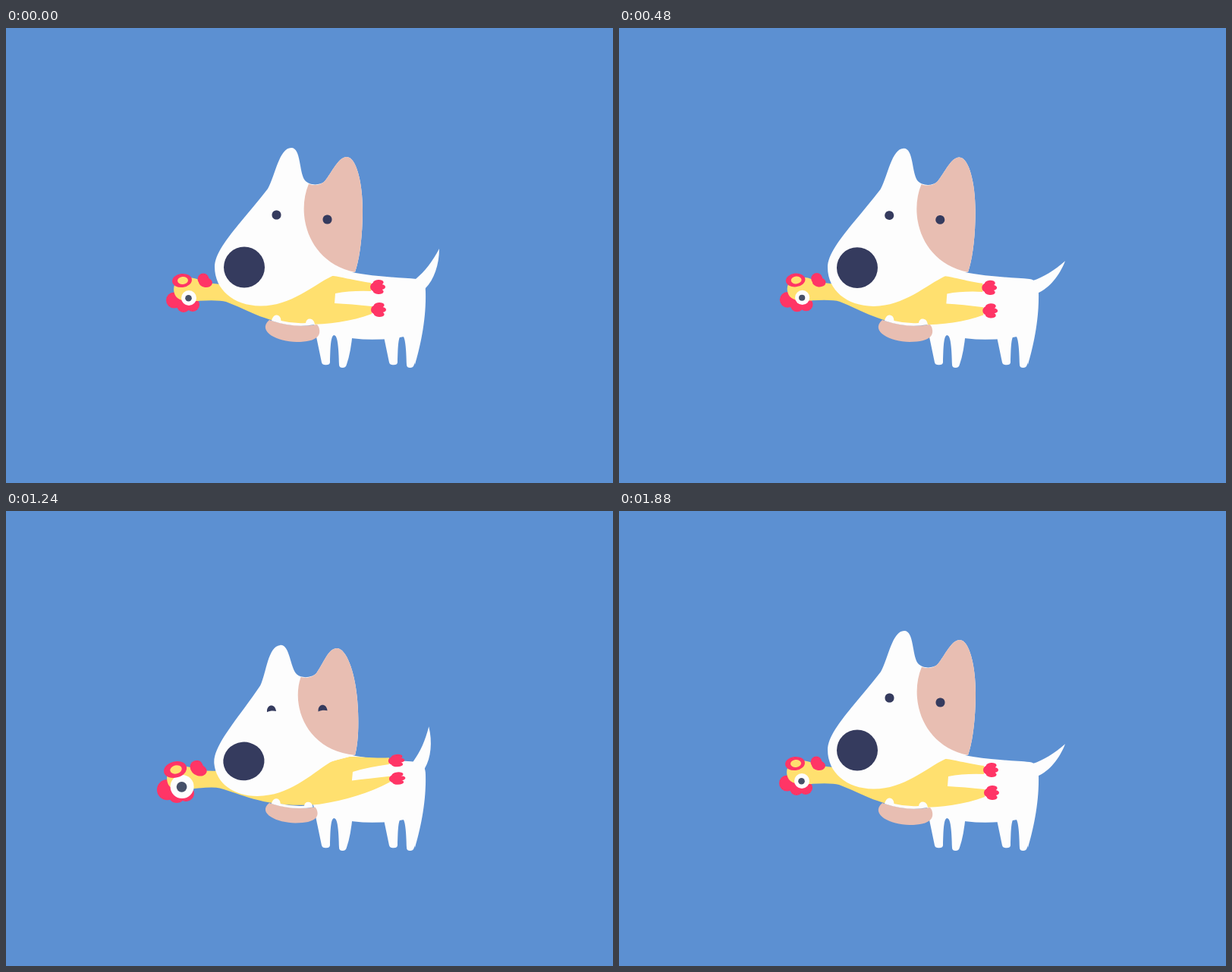
Recreate the animation shown at these times as an HTML page. Size 800 by 600 pixels, loop 1.92 s.

```html
<!DOCTYPE html>
<html lang="en">
<head>
<meta charset="utf-8">
<title>Dog with rubber chicken</title>
<style>
  html, body { margin: 0; width: 100%; height: 100%; overflow: hidden; background: #5c90d2; }
  svg { display: block; width: 100%; height: 100%; }
</style>
</head>
<body>
<svg id="stage" viewBox="0 0 800 600"></svg>
<script>
const LOOP = 1920, BITE = 960, STEP = 40;
const WHITE = '#fdfdfd', PINK = '#e8beb2', DARK = '#353b5e', YELLOW = '#ffe06f', RED = '#ff3566';

const stage = document.getElementById('stage');
const poses = [];

function add(parent, tag, attrs = {}) {
  const el = document.createElementNS('http://www.w3.org/2000/svg', tag);
  for (const name in attrs) el.setAttribute(name, attrs[name]);
  return parent.appendChild(el);
}

const path = (parent, fill, d = '') => add(parent, 'path', { fill, d });

// Each pose sets one attribute from the current squeeze amounts
const pose = (el, attr, rule) => poses.push(k => el.setAttribute(attr, rule(k)));

const ease = x => (1 - Math.cos(Math.PI * Math.min(1, Math.max(0, x)))) / 2;

// The jaws close, hold briefly and open
const biteAt = t => ease(t / 240) - ease((t - 280) / 230);

// The chicken stretches, then springs back with a small overshoot
function stretchAt(t) {
  const peak = 285, after = t - peak;
  return after < 0 ? ease(t / peak) : Math.exp(-after / 80) * Math.cos(Math.PI * after / 240);
}

// Loose wag through a few moments: [ms, swing]
const wag = [[0, 0], [200, 0.16], [480, 1], [800, -1], [1240, -0.65], [1400, 1], [1720, -1], [1880, 1], [LOOP, 0]];

function wagAt(t) {
  const i = wag.findIndex(([ms]) => ms > t);
  const [t0, v0] = wag[i - 1], [t1, v1] = wag[i];
  return v0 + (v1 - v0) * ease((t - t0) / (t1 - t0));
}

// Pulls a point of the chicken outwards from the mouth and bends its legs up
function stretch(x, y, k) {
  const u = x - 365, back = Math.max(0, u);
  const dx = 7.5 + 16.5 * Math.tanh(u / 40);
  const dy = -0.06 * u - 0.0006 * back ** 2 - 0.0018 * back * (y - 357);
  return [x + dx * k, y + dy * k];
}

const stretchPath = (d, k) =>
  d.replace(/([\d.]+),([\d.]+)/g, (_, x, y) => stretch(+x, +y, k).map(n => n.toFixed(2)).join());

function blob(fill, x, y, rx, ry, grow, turn = 0) {
  const el = add(stage, 'ellipse', { rx, ry, fill });
  pose(el, 'transform', k =>
    `translate(${stretch(x, y, k.toy)}) rotate(${turn * (1 + k.toy)}) scale(${1 + grow * k.toy})`);
}

function foot(x, y) {
  const g = add(stage, 'g', { fill: RED });
  add(g, 'ellipse', { cx: 6, rx: 6, ry: 6 });
  for (const i of [-1, 0, 1]) {
    add(g, 'ellipse', { cx: 13 - 2 * Math.abs(i), cy: 5 * i, rx: 7, ry: 3.8, transform: `rotate(${4 * i})` });
  }
  pose(g, 'transform', ({ toy: k }) =>
    `translate(${stretch(x, y, k)}) rotate(${-4 * k}) scale(${1 + 0.08 * k} ${1 - 0.14 * k})`);
}

function legs(x) {
  path(stage, WHITE, 'M-25,400 L-16.5,441 Q-15.5,444.5 -11,444.3 Q-6,444.5 -5.5,441 C-5,425 -5,405 0,405' +
    ' C5,405 6,425 6.5,444 Q6.5,448 11,448 Q15.5,448 16.5,443.5 Q22,428 24.5,400 Z')
    .setAttribute('transform', `translate(${x})`);
}

function eye(x, y) {
  const el = path(head, DARK);
  el.setAttribute('transform', `translate(${x} ${y})`);
  pose(el, 'd', ({ bite: k }) => {
    const lid = 3.5 * k, dip = 8 - 6 * k, w = 6 - 3 * k;
    return `M-6,${lid} C-6,-8 6,-8 6,${lid} C${w},${dip} ${-w},${dip} -6,${lid} Z`;
  });
}

// Tail and body
const tail = path(stage, WHITE, 'M571,291 C571,312 564,332 553,343 L545,356 L530,345 L540,331 C552,321 562,308 571,291 Z');
pose(tail, 'transform', k => `rotate(${21 * k.wag} 536 345)`);
path(stage, WHITE, 'M400,330 L455,322 C485,328 520,329 541,331 C549,332 553,338 553,348' +
  ' C554,385 546,420 539,444 L530,406 Q480,416 432,405 L410,403 L404,385 Z');
legs(432.5);
legs(521.5);

// Rubber chicken
blob(RED, 221.5, 359, 10.5, 10.5, 0.3);
blob(RED, 234, 366, 9, 9, 0.25);
blob(RED, 246, 365, 9, 9, 0.2);
const chicken = 'M222,350 C216,332 240,324 256,333 Q270,338 290,338 L330,355 L400,335 Q415,330 430,327' +
  ' C438,327 458,333 481,336 L481,347 Q455,346 434,350 L433,363 Q455,364 482,367 L482,377' +
  ' C455,387 425,391 395,391 C345,391 320,372 290,361 Q280,358 250,360 C235,362 224,358 222,350 Z';
pose(path(stage, YELLOW), 'd', k => stretchPath(chicken, k.toy));
blob(WHITE, 241, 356, 10, 10, 0.55);
blob('#465068', 240.5, 356.3, 4.3, 4.3, 0.6);
blob(RED, 232, 333, 13, 9, 0.18, -7);
blob(YELLOW, 233, 333, 7, 5, 0.12, -7);
blob(RED, 260, 331, 7.5, 7.5, 0.15);
blob(RED, 263, 335.5, 9, 6.5, 0.18, 8);
foot(480, 341.5);
foot(481, 371.5);

// Head, tilting and flattening around the neck
const head = add(stage, 'g');
pose(head, 'transform', ({ bite: k }) =>
  `translate(460 322) matrix(1 ${-0.096 * k} ${0.09 * k} ${1 - 0.066 * k} 0 0) translate(-460 -322)`);
const spottedEar = 'C430,190 438,170 449,170 C462,170 470,205 470,240 C470,275 466,305 460,322';
path(head, WHITE, 'M275,315 C275,290 311,256 345,212 C355,194 360,158 376,158 C389,158 386,190 394,201' +
  ` C400,208 414,208 420,202 ${spottedEar} L430,327 C405,339 375,367 335,366.5 C300,366 275,345 275,315 Z`);
path(head, PINK, `M399,205.5 C405,208 414,208 420,202 ${spottedEar} C398,309 382,246 399,205.5 Z`);
add(head, 'circle', { cx: 314, cy: 315.5, r: 27, fill: DARK });
eye(356.5, 246.5);
eye(423.5, 252.5);

// Jaw and teeth
const jaw = add(stage, 'g');
pose(jaw, 'transform', ({ bite: k }) =>
  `translate(345 386) scale(${1 - 0.04 * k} ${1 - 0.09 * k}) translate(-345 -386)`);
path(jaw, PINK, 'M347,385 C330,400 358,414 383,414 C412,414 416,404 412,394 L410,391 Q380,396 347,385 Z');
path(jaw, WHITE, 'M350,386 Q352,378 357,378.5 Q362,379 362.5,386 Q378,390 395,389' +
  ' Q396,383 401,383.5 Q406,384 407,391 Q380,396 350,386 Z');

function draw(ms) {
  const t = Math.floor(ms % LOOP / STEP) * STEP;
  const k = { bite: biteAt(t % BITE), toy: stretchAt(t % BITE), wag: wagAt(t) };
  for (const set of poses) set(k);
}

let start;
function tick(now) {
  start ??= now;
  draw(now - start);
  requestAnimationFrame(tick);
}
draw(0);
requestAnimationFrame(tick);
</script>
</body>
</html>
```
